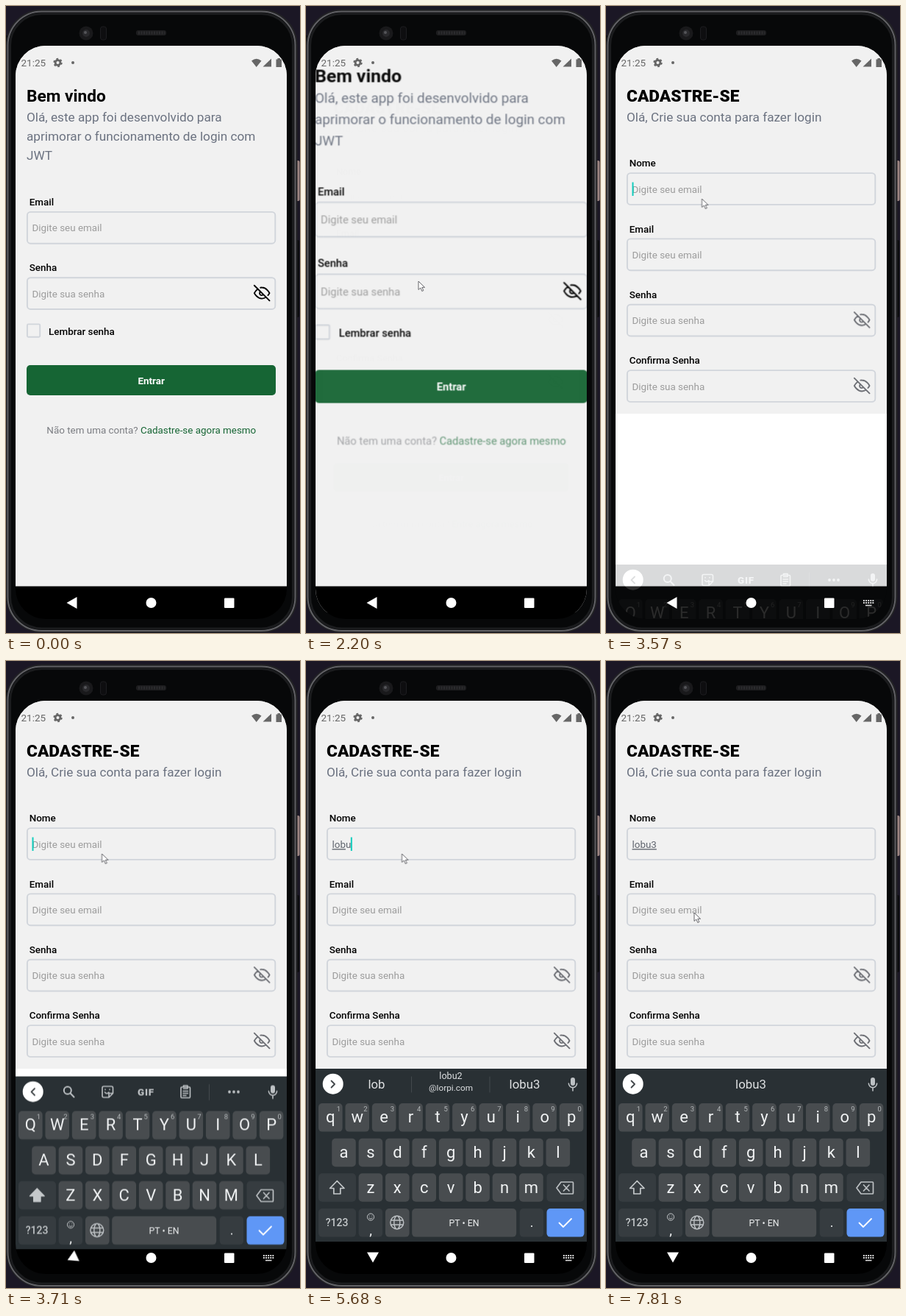
These frames come from a looping animation (400 px wide and 852 px high, 8000 ms). An HTML page:

```html
<!DOCTYPE html>
<html lang="pt-BR">
<head>
<meta charset="utf-8">
<title>Cadastro</title>
<style>
html, body { margin: 0; width: 100%; height: 100%; overflow: hidden; background: #1b1725; }
svg { display: block; width: 400px; height: 852px; }
text { font: 13.42px Roboto, sans-serif; white-space: pre; }
.title { font-size: 22.7px; font-weight: 700; }
.title.heavy { font-weight: 800; }
.sub { font-size: 17.2px; fill: #6b7280; }
.label { font-weight: 500; }
.hint { fill: #9c9c9c; }
.box { fill: none; stroke: #d1d5db; stroke-width: 1.9; }
.btn { fill: #166534; }
.btn-text { fill: #fff; font-weight: 700; }
.mid { text-anchor: middle; }
.line { fill: none; stroke-linecap: round; stroke-linejoin: round; }
.typed { fill: #5f646d; }
.typed .u { text-decoration: underline; text-decoration-thickness: 1px; }
.key { font-size: 22px; fill: #f1f3f4; text-anchor: middle; }
.num { font-size: 9.5px; fill: #b4b8ba; text-anchor: middle; }
.word { font-size: 16.8px; fill: #dfe1e3; text-anchor: middle; }
.word.two { font-size: 12.6px; }

#cursor, #link, #login, #register, #kb, #back { animation: 8s step-end infinite; }
#login, #register { transform-origin: 197.5px 419px; }
#back { transform-origin: 90px 810px; animation-name: turn; }
#cursor { animation-name: move; }
#link { animation: press 8s linear infinite; }
#login { animation-name: leave; }
#register { animation-name: enter; }
#kb { animation-name: rise; }

@keyframes move {
  0% { transform: translate(374px, 860px); }
  .75% { transform: translate(371px, 860px); animation-timing-function: steps(12); }
  11.125% { transform: translate(245px, 638px); animation-timing-function: steps(5); }
  16.25% { transform: translate(175px, 580px); animation-timing-function: steps(2); }
  17.75% { transform: translate(187px, 574px); animation-timing-function: steps(3); }
  20.625% { transform: translate(185px, 562px); }
  22.25% { transform: translate(185px, 562px); animation-timing-function: steps(6); }
  27.5% { transform: translate(153px, 374px); animation-timing-function: steps(5); }
  32.5% { transform: translate(142px, 351px); animation-timing-function: steps(11); }
  42.875% { transform: translate(130.5px, 262px); }
  93.25% { transform: translate(130.5px, 262px); animation-timing-function: steps(5); }
  97.625%, 100% { transform: translate(120px, 342px); }
}
@keyframes press {
  0%, 18% { opacity: 1; }
  19.75%, 25.75% { opacity: .25; }
  27.5% { opacity: .68; }
  29.25%, 100% { opacity: 1; }
}
@keyframes leave {
  0% { transform: none; opacity: 1; }
  26.625% { transform: scale(1.02); }
  27.5% { transform: scale(1.0945); opacity: .96; }
  28.375%, 100% { transform: scale(1.13); opacity: 0; }
}
@keyframes enter {
  0% { transform: scale(.85); opacity: 0; }
  27.5% { transform: scale(.944); opacity: .01; }
  28.375% { transform: scale(.972); opacity: 1; }
  29.25% { transform: scale(.987); opacity: 1; }
  30.125% { transform: scale(.995); opacity: 1; }
  31.25%, 100% { transform: none; opacity: 1; }
}
@keyframes rise {
  0% { transform: translateY(235px); opacity: 0; }
  44.625% { transform: translateY(205px); opacity: .18; }
  45.5% { transform: translateY(62px); opacity: .85; }
  46.375% { transform: translateY(10.5px); opacity: 1; }
  47.25% { transform: translateY(3px); opacity: 1; }
  48.125%, 100% { transform: none; opacity: 1; }
}
@keyframes turn {
  0% { transform: none; }
  46.375% { transform: rotate(-25deg); }
  47.25% { transform: rotate(-58deg); }
  48.125% { transform: rotate(-82deg); }
  49%, 100% { transform: rotate(-90deg); }
}
</style>
</head>
<body>
<svg viewBox="0 0 400 852">
  <defs>
    <clipPath id="screen"><rect x="13" y="54" width="369" height="779" rx="41"/></clipPath>
    <g id="eye" class="line" stroke-width="2">
      <path d="M17.9 17.9A10 10 0 0 1 12 20C5 20 1 12 1 12A18.500 18.500 0 0 1 6.100 6.100M9.900 4.200A9 9 0 0 1 12 4C19 4 23 12 23 12A18.500 18.500 0 0 1 20.800 15.200M14.100 14.100A3 3 0 1 1 9.900 9.900M1 1L23 23"/>
    </g>
    <g id="mic">
      <rect x="-3" y="-9" width="6" height="11" rx="3" fill="#bdc1c4"/>
      <path class="line" stroke="#bdc1c4" stroke-width="1.6" d="M-5.6 -1a5.6 5.6 0 0 0 11.2 0M0 5v4"/>
    </g>
  </defs>

  <!-- phone body -->
  <rect width="400" height="852" fill="#1b1725"/>
  <rect y="40" width="12" height="770" fill="#0a0a0c"/>
  <rect x="394" y="210" width="5.500" height="55" rx="2" fill="#9c8582"/>
  <rect x="393" y="318" width="6" height="105" rx="2" fill="#0b0b0d"/>
  <rect x="1" y="5.500" width="394.500" height="845" rx="48" fill="#08080a" stroke="#222225" stroke-width="2"/>
  <rect x="2.500" y="7.500" width="391" height="841.500" rx="46" fill="#0a0b0d" stroke="#626266" stroke-width="2"/>
  <rect x="5.500" y="10.500" width="385" height="835.500" rx="43" fill="#070809" stroke="#1b1c1e" stroke-width="3"/>
  <circle cx="109" cy="37" r="9.500" fill="#19191b"/>
  <circle cx="109" cy="37" r="5" fill="#29292c"/>
  <circle cx="108" cy="36" r="2" fill="#55565a"/>
  <rect x="128.500" y="28" width="8" height="18" rx="3" fill="#0e0e10" stroke="#1d1d20"/>
  <rect x="177" y="33" width="41" height="7" rx="3" fill="#1d1d1f"/>
  <path d="M180 36.500H216" stroke="#2c2c2f" stroke-width="4" stroke-dasharray="2 1.500"/>

  <g clip-path="url(#screen)">
    <rect x="13" y="54" width="369" height="735" fill="#fff"/>
    <g id="login"></g>
    <g id="register"></g>

    <!-- status bar -->
    <g fill="#666">
      <text x="20.500" y="82" style="font-size:13.500px">21:25</text>
      <circle cx="70.500" cy="77" r="3.400" fill="none" stroke="#666" stroke-width="2.800"/>
      <circle cx="70.500" cy="77" r="5.200" fill="none" stroke="#666" stroke-width="2" stroke-dasharray="2.700 2.745"/>
      <circle cx="91" cy="77" r="2"/>
      <path d="M334 74.500Q340.700 69 347.500 74.500L340.700 83ZM361 71.500V82.500H349.500Z"/>
      <path d="M367.500 72.500h2v-1.500h3.500v1.500h2v10.500h-7.500z"/>
    </g>

    <rect x="13" y="788.500" width="369" height="45" fill="#000"/>
    <g id="kb"></g>

    <!-- navigation bar -->
    <g fill="#fff">
      <path id="back" d="M82.500 811L96.500 803V819Z"/>
      <circle cx="197.500" cy="811" r="7"/>
      <rect x="297" y="804.500" width="13.500" height="13.500" rx="1"/>
      <g data-show="3500 8000">
        <path d="M350 808h14.500M350 811h14.500" stroke="#ddd" stroke-width="1.800" stroke-dasharray="1.900 1.200"/>
        <path d="M353 814.500h8.500" stroke="#ddd" stroke-width="1.600"/>
      </g>
    </g>
  </g>

  <path id="cursor" d="M0 0V11.500L2.800 9L4.800 13.500L6.800 12.600L4.800 8.300H8.500Z" fill="#fff" stroke="#55555a" stroke-width=".9"/>
</svg>

<script>
const LOOP = 8000;
const $ = id => document.getElementById(id);

const text = (x, y, s, cls = '', attrs = '') => `<text x="${x}" y="${y}" class="${cls}" ${attrs}>${s}</text>`;
const group = (a, b, s) => `<g data-show="${a} ${b}">${s}</g>`;
const button = (y, s) => `<rect class="btn" x="28" y="${y}" width="339" height="41" rx="5"/>` + text(197.7, y + 25.7, s, 'btn-text mid');
const backdrop = (y, h) => `<rect x="13" y="${y}" width="369" height="${h}" fill="#f1f1f1"/>`;

// y is the top edge of the input
function field(label, y, hint, eye) {
  return text(31.7, y - 7.9, label, 'label') +
    `<rect class="box" x="28.900" y="${y + .9}" width="337.400" height="42.800" rx="4.500"/>` +
    (hint ? text(35.5, y + 27.4, hint, 'hint') : '') +
    (eye ? `<use href="#eye" stroke="${eye}" transform="translate(336.900 ${y + 10.5}) scale(.94)"/>` : '');
}

const footer = (y, ask, act, id = '') =>
  `<text class="mid" ${id} x="197.800" y="${y}" fill="#7b7d82">${ask} <tspan fill="#166534">${act}</tspan></text>`;

$('login').innerHTML = backdrop(54, 735) +
  text(28, 130.3, 'Bem vindo', 'title') +
  text(28, 156.7, 'Olá, este app foi desenvolvido para', 'sub') +
  text(28, 183, 'aprimorar o funcionamento de login com', 'sub') +
  text(28, 209.3, 'JWT', 'sub') +
  field('Email', 279, 'Digite seu email') +
  field('Senha', 368.3, 'Digite sua senha', '#000') +
  '<rect class="box" x="28.900" y="432.400" width="17.300" height="17.300" rx="1.500"/>' +
  text(58, 446.6, 'Lembrar senha', 'label') +
  button(488, 'Entrar') +
  footer(581, 'Não tem uma conta?', 'Cadastre-se agora mesmo', 'id="link"');

// start, typed text, underlined letters, caret shown
const typing = [
  [0, '', 0, 0], [3430, '', 0, 1], [4400, '', 0, 0],
  [4660, 'l', 0, 1], [4860, 'l', 1, 1], [5010, 'lo', 1, 1], [5200, 'lo', 2, 1],
  [5340, 'lob', 2, 1], [5540, 'lob', 3, 1], [5680, 'lobu', 3, 1], [5940, 'lobu', 4, 1],
  [6410, 'lobu', 4, 0], [6870, 'lobu3', 4, 1], [7070, 'lobu3', 5, 1], [7530, 'lobu3', 5, 0]
];
const until = (list, i) => i + 1 < list.length ? list[i + 1][0] : LOOP;

const nameStates = typing.map(([at, word, lined, caret], i) => group(at, until(typing, i),
  (word
    ? text(35.5, 254.2, `<tspan class="u">${word.slice(0, lined)}</tspan>${word.slice(lined)}`, 'typed')
    : text(35.5, 254.2, 'Digite seu email', 'hint')) +
  (caret ? `<rect class="caret" x="35.500" y="239.500" width="2" height="18.500" fill="#12cdbd"/>` : ''))).join('');

$('register').innerHTML =
  group(0, 3500, backdrop(54, 735) + button(633, 'Entrar') + footer(725.5, 'Já tem uma conta?', 'Entre agora mesmo')) +
  group(3500, LOOP, backdrop(54, 500)) +
  text(28, 130.3, 'CADASTRE-SE', 'title heavy') +
  text(28, 156.7, 'Olá, Crie sua conta para fazer login', 'sub') +
  field('Nome', 226.2) + nameStates +
  field('Email', 315.5, 'Digite seu email') +
  field('Senha', 404.8, 'Digite sua senha', '#6e7076') +
  field('Confirma Senha', 494.2, 'Digite sua senha', '#6e7076');

// keyboard
const PITCH = 36.42;
const rows = [['qwertyuiop', 33.3, 620], ['asdfghjkl', 51.5, 667.7], ['zxcvbnm', 87.9, 715.2]];
const cap = (x, y, w, fill) => `<rect x="${x}" y="${y - 19}" width="${w}" height="38.600" rx="5" fill="${fill}"/>`;
const letters = fn => rows.map(([keys, x, y], r) => [...keys].map((k, i) => fn(k, x + i * PITCH, y, r, i)).join('')).join('');
const faces = change => letters((k, x, y) => text(x, y + 7.4, change(k), 'key'));
const stroke = (d, w = 1.8, c = '#bdc1c4') => `<path class="line" d="${d}" stroke="${c}" stroke-width="${w}"/>`;
const shift = fill => `<path d="M42.300 706.500L52 716.500H46.800V724H37.800V716.500H32.600Z" fill="${fill}" stroke="#c4c8ca" stroke-width="1.700" stroke-linejoin="round"/>`;
const divider = x => stroke(`M${x} 565V586`, 1, '#43494d');
const DIM = '#363c40', KEY = '#484c4f', BLUE = '#5f97f6';

const tools =
  stroke('M39 570.500L34.500 575L39 579.500', 1.8, '#42474a') +
  '<circle cx="83.800" cy="573" r="5" fill="none" stroke="#bdc1c4" stroke-width="2"/>' + stroke('M87.600 577L92.500 582', 2) +
  stroke('M133 567.500H143.500Q145.500 567.500 145.500 569.500V577L140 582.500H133Q131 582.500 131 580.500V569.500Q131 567.500 133 567.500M145 577H140V582M134.500 575.500Q137 579 140 575.500M135 571.500V572M141 571.500V572', 1.6) +
  text(190.5, 579.5, 'GIF', 'mid', 'fill="#bdc1c4" style="font-weight:900;letter-spacing:.8px"') +
  stroke('M239 568.500H249.500Q250.500 568.500 250.500 569.500V582Q250.500 583 249.500 583H239Q238 583 238 582V569.500Q238 568.500 239 568.500M241.500 568.500V566.500H247V570.500H241.500M241 574H247.500M241 577H247.500M241 580H245', 1.6) +
  divider(276.5) +
  [304, 310, 316].map(x => `<circle cx="${x}" cy="575" r="1.900" fill="#bdc1c4"/>`).join('');

// start, then left, centre and right words; "|" splits a word over two lines
const hints = [
  [4660, '', '', ''],
  [4860, 'l', 'lá', 'lobu'],
  [5200, 'lo', 'lobu', 'lobu3'],
  [5540, 'lob', 'lobu2|@lorpi.com', 'lobu3'],
  [5940, 'lobu', 'lobu2', 'lobu3'],
  [7070, '', 'lobu3', '']
];
const suggestion = (s, x) => {
  const [a, b] = s.split('|');
  return b
    ? text(x, 568.3, a, 'word two', 'font-weight="500"') + text(x, 583.8, b, 'word two', 'style="font-size:11.800px"')
    : text(x, 581, a, 'word');
};
const strip = hints.map(([at, ...words], i) => group(at, until(hints, i),
  words.map((s, k) => suggestion(s, [96, 197, 297.5][k])).join('') +
  (words[0] ? divider(143.5) + divider(250) : ''))).join('');

$('kb').innerHTML = '<rect x="13" y="554" width="369" height="235" fill="#293034"/>' +
  '<circle cx="36.700" cy="574.700" r="14" fill="#fff"/><use href="#mic" x="363" y="575"/>' +
  group(0, 4660, tools) +
  group(4660, LOOP, stroke('M34.500 570.500L39 575L34.500 579.500', 1.8, '#42474a') + strip) +
  letters((k, x, y, r, i) => cap(x - 16.3, y, 32.6, KEY) + (r ? '' : text(x + 11.2, y - 8, (i + 1) % 10, 'num'))) +
  cap(17, 715.2, 51, DIM) +
  group(0, 4660, faces(k => k.toUpperCase()) + shift('#c4c8ca')) +
  group(4660, LOOP, faces(k => k) + shift('none')) +
  cap(327.5, 715.2, 51, DIM) +
  stroke('M347 708H362.500Q363.500 708 363.500 709V723Q363.500 724 362.500 724H347L341 716ZM350.500 712L358 720M358 712L350.500 720', 1.7) +
  cap(17, 763, 51, DIM) + text(42, 768, '?123', 'mid', 'fill="#c4c8ca" style="font-size:14px;font-weight:500"') +
  cap(71.6, 763, 32.6, DIM) + text(88, 780, ',', 'key', 'style="font-size:19px"') +
  '<circle cx="88" cy="755.500" r="4.600" fill="none" stroke="#c4c8ca"/>' + stroke('M86.200 754V754.200M89.800 754V754.200M85.700 757Q88 759.500 90.300 757', 1) +
  cap(108, 763, 32.6, KEY) +
  stroke('M114.800 763a9 9 0 1 0 18 0a9 9 0 1 0 -18 0M119.800 763a4 9 0 1 0 8 0a4 9 0 1 0 -8 0M115.800 760H131.800M115.800 766H131.800', 1.4) +
  cap(144.2, 763, 142, KEY) + text(215, 767.7, 'PT • EN', 'mid', 'fill="#eceeef" style="font-size:12.300px"') +
  cap(290.7, 763, 32.4, DIM) + text(307, 769, '.', 'key', 'style="font-size:18px"') +
  cap(327.5, 763, 51, BLUE) + stroke('M344.500 763.500L350 769L361 758', 1.8, '#fff');

document.querySelectorAll('.caret').forEach(c => {
  const word = c.parentNode.querySelector('.typed');
  if (word) c.setAttribute('x', 35 + word.getComputedTextLength());
});

// data-show="from to" makes an element visible only in that span of the loop
document.querySelectorAll('[data-show]').forEach(el => {
  const [a, b] = el.dataset.show.split(' ').map(Number);
  const last = b === LOOP ? 1 : 0;
  const step = (opacity, at) => ({ opacity, offset: at / LOOP, easing: 'step-end' });
  el.animate([step(a ? 0 : 1, 0), step(1, a), step(last, b), step(last, LOOP)],
    { duration: LOOP, iterations: Infinity });
});
</script>
</body>
</html>
```
